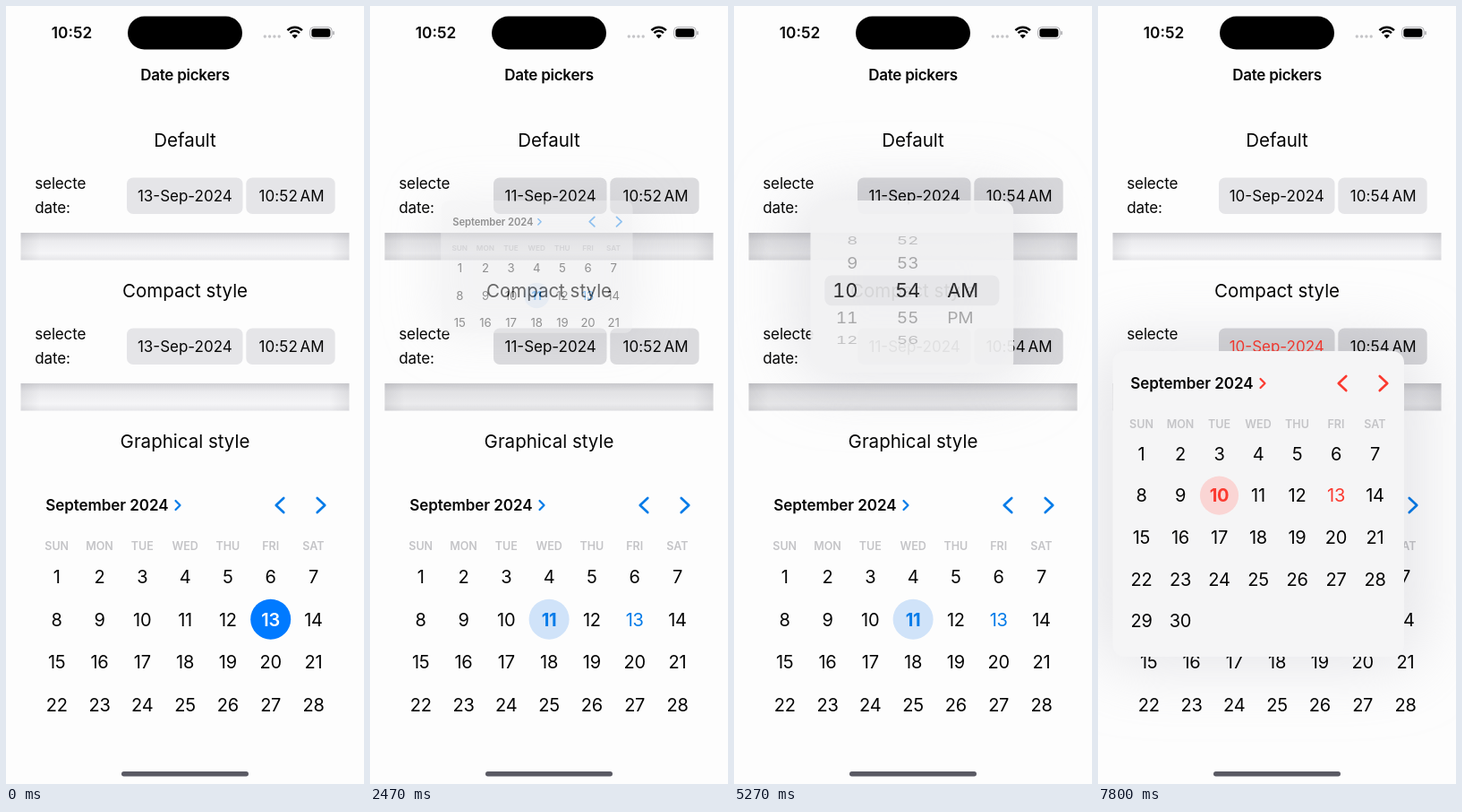
An HTML page for the animation above (8 s loop, 400 by 868 pixels).

```html
<!DOCTYPE html>
<html lang="en">
<head>
<meta charset="utf-8">
<title>Date pickers</title>
<style>
html, body { margin: 0; width: 100%; height: 100%; overflow: hidden; background: #fdfdfd; }
svg { display: block; width: 100vw; height: 100vh; font-family: Inter, Roboto, sans-serif; }
text { white-space: pre; }
.shade { mix-blend-mode: multiply; }
.wheel { font-feature-settings: "tnum"; }
</style>
</head>
<body>
<svg id="stage" viewBox="0 0 400 868">
  <defs>
    <linearGradient id="band" x2="0" y2="1">
      <stop offset="0" stop-color="#d0d0d4"/>
      <stop offset=".3" stop-color="#ebebee"/>
      <stop offset=".75" stop-color="#f5f5f7"/>
      <stop offset="1" stop-color="#e6e6e9"/>
    </linearGradient>
    <linearGradient id="ends">
      <stop offset="0" stop-color="#85858c" stop-opacity=".16"/>
      <stop offset=".06" stop-color="#85858c" stop-opacity="0"/>
      <stop offset=".94" stop-color="#85858c" stop-opacity="0"/>
      <stop offset="1" stop-color="#85858c" stop-opacity=".16"/>
    </linearGradient>
    <filter id="blur" filterUnits="userSpaceOnUse" x="-200" y="0" width="800" height="1000">
      <feGaussianBlur stdDeviation="36"/>
    </filter>
  </defs>
</svg>
<script>
const LOOP = 8000, TODAY = 13;
const INK = '#050505', BLUE = '#047be8', RED = '#fb3a30', GRAY = '#c4c4c7';
const stage = document.getElementById('stage');
const defs = stage.querySelector('defs');

function set(node, attrs) {
  for (const key in attrs) node.setAttribute(key, attrs[key]);
  return node;
}
function add(parent, tag, attrs) {
  const node = document.createElementNS('http://www.w3.org/2000/svg', tag);
  parent.appendChild(node);
  return set(node, attrs);
}
function label(parent, str, x, y, size, attrs) {
  const node = add(parent, 'text', { x, y, 'font-size': size, fill: INK, ...attrs });
  node.textContent = str;
  return node;
}
const box = (parent, x, y, width, height, rx, fill, attrs) =>
  add(parent, 'rect', { x, y, width, height, rx, fill, ...attrs });
const clamp = v => Math.max(0, Math.min(1, v));
const centered = { 'text-anchor': 'middle' };
const bold = { 'font-weight': 600 };

// Opening has a slight bounce, closing has none.
function springIn(t) {
  if (t <= 0) return 0;
  const w = 0.0165, zeta = 0.85, root = Math.sqrt(1 - zeta * zeta), phase = w * root * t;
  return 1 - Math.exp(-zeta * w * t) * (Math.cos(phase) + zeta / root * Math.sin(phase));
}
function springOut(t) {
  const wt = 0.0129 * Math.max(0, t);
  return (1 + wt) * Math.exp(-wt);
}

function chevron(parent, x, y, w, h, color, width) {
  add(parent, 'path', {
    d: `M${x - w / 2} ${y - h / 2}l${w} ${h / 2}l${-w} ${h / 2}`,
    fill: 'none', stroke: color, 'stroke-width': width,
    'stroke-linecap': 'round', 'stroke-linejoin': 'round'
  });
}

function statusBar() {
  label(stage, '10:52', 73.5, 36, 17.2, { ...centered, ...bold });
  box(stage, 136, 11.5, 128, 37, 18.5, '#000');
  for (let i = 0; i < 4; i++) add(stage, 'circle', { cx: 289.3 + i * 5.3, cy: 34, r: 1.7, fill: GRAY });
  for (const r of [11.6, 7.4]) {
    const d = r * 0.71;
    add(stage, 'path', {
      d: `M${322.7 - d} ${35.3 - d}A${r} ${r} 0 0 1 ${322.7 + d} ${35.3 - d}`,
      fill: 'none', stroke: '#000', 'stroke-width': 2.5
    });
  }
  add(stage, 'path', { d: 'M322.7 36.3l-3.2 -3.3a4.6 4.6 0 0 1 6.4 0z', fill: '#000' });
  box(stage, 339.6, 23.6, 24.6, 12.8, 4, 'none', { stroke: '#aeaeb2' });
  box(stage, 341.4, 25.3, 21, 9.4, 2.6, '#000');
  box(stage, 365.2, 28, 1.7, 4.2, 0.8, '#aeaeb2');
  label(stage, 'Date pickers', 200, 83, 17, { ...centered, ...bold, 'letter-spacing': -0.25 });
}

function pickerRow(title, y) {
  label(stage, title, 200, y, 20.5, centered);
  const body = { 'letter-spacing': -0.15 };
  label(stage, 'selecte', 32.3, y + 47, 17, body);
  label(stage, 'date:', 32.3, y + 74, 17, body);
  const dateBox = box(stage, 135, y + 34.5, 129.5, 40.5, 7);
  const timeBox = box(stage, 268.3, y + 34.5, 99.4, 40.5, 7);
  const end = { 'text-anchor': 'end' };
  const date = label(stage, '', 252.8, y + 61, 17, end);
  const time = label(stage, '', 355.8, y + 61, 17, { ...end, 'letter-spacing': 0.1 });
  const clock = add(time, 'tspan', {});
  add(time, 'tspan', { dx: 2.6 }).textContent = 'AM';
  box(stage, 16.5, y + 96, 367, 30.5, 0, 'url(#band)');
  box(stage, 16.5, y + 96, 367, 30.5, 0, 'url(#ends)');
  const veil = box(stage, 16.5, y + 96, 367, 30.5, 0, '#707074');
  return (day, minute, dim, dateColor, timeColor) => {
    const x = day === 11 ? 138 : 135;
    const mix = (a, b) => Math.round(a + (b - a) * dim);
    const fill = `rgb(${mix(229, 214)},${mix(229, 214)},${mix(232, 217)})`;
    set(dateBox, { x, width: 264.5 - x, fill });
    set(timeBox, { fill });
    set(date, { fill: dateColor }).textContent = day + '-Sep-2024';
    set(time, { fill: timeColor });
    clock.textContent = '10:' + minute;
    set(veil, { opacity: 0.12 * dim });
  };
}

function calendar(parent, o) {
  label(parent, 'September 2024', o.left - 0.8, o.head + 6.1, 17, { ...bold, 'letter-spacing': -0.05 });
  chevron(parent, o.left + 147, o.head, 5, 10, o.color, 2.2);
  chevron(parent, o.nav, o.head, -8.5, 16, o.color, 2.7);
  chevron(parent, o.nav + 46, o.head, 8.5, 16, o.color, 2.7);
  const colX = c => o.x + c * o.dx, rowY = r => o.y + r * o.dy;
  'SUN MON TUE WED THU FRI SAT'.split(' ').forEach((name, c) =>
    label(parent, name, colX(c), o.week + 4.5, 12.5, { ...centered, ...bold, fill: GRAY }));
  const at = day => ({ cx: colX((day - 1) % 7), cy: rowY(Math.floor((day - 1) / 7)) });
  const solid = add(parent, 'circle', { ...at(TODAY), r: o.r, fill: '#007aff' });
  const pale = add(parent, 'circle', { r: o.r, fill: o.pale });
  const days = [];
  for (let d = 1; d <= o.last; d++) {
    const p = at(d);
    days[d] = label(parent, d, p.cx, p.cy + 7.3, 20, { ...centered, 'letter-spacing': -0.2 });
  }
  return (picked, fade) => {
    const today = picked === TODAY;
    set(solid, { opacity: today ? 1 : 1 - fade });
    set(pale, { ...at(picked), opacity: today ? 0 : fade });
    days.forEach((node, d) => {
      const on = d === picked;
      const fill = on && today ? '#fff' : on || d === TODAY ? o.color : INK;
      set(node, { fill, 'font-weight': on ? (today ? 600 : 700) : 400 });
    });
  };
}

// The panel grows from a point on its top edge; its height lags behind its width.
function popover(id, x, y, w, h, anchor, fill) {
  const shade = box(stage, x - 18, y - 8, w + 36, h + 16, 40, '#cdcdd4', { class: 'shade', filter: 'url(#blur)' });
  const group = add(stage, 'g', {});
  const clip = box(add(defs, 'clipPath', { id }), x, y, w, h, 13);
  const panel = box(group, x, y, w, h, 13, fill);
  const content = add(group, 'g', { 'clip-path': `url(#${id})` });
  const show = s => {
    const display = s < 0.03 ? 'none' : 'inline';
    const transform = `translate(${anchor} ${y}) scale(${s}) translate(${-anchor} ${-y})`;
    const opacity = clamp(Math.pow(s, 2.1));
    set(group, { display, transform, opacity });
    set(shade, { display, transform, opacity: 0.5 * opacity, height: h * s + 16 });
    set(panel, { height: h * s });
    set(clip, { height: h * s });
  };
  return { content, show };
}

function datePopover(id, y, color, pale) {
  const pop = popover(id, 16.5, y, 325.5, 341, 200, '#f5f5f6');
  const pick = calendar(pop.content, {
    left: 37, head: y + 36, nav: 273, week: y + 81, x: 48.5, dx: 43.5,
    y: y + 114.5, dy: 46.6, r: 21.6, last: 30, color, pale
  });
  return { show: pop.show, pick };
}

function wheel(parent, x, anchor, text) {
  const items = [];
  for (let k = -3; k <= 3; k++) {
    items.push(label(parent, '', 0, 8.3, 23, { class: 'wheel', 'text-anchor': anchor, fill: '#202022', 'letter-spacing': -0.2 }));
  }
  return pos => items.forEach((node, i) => {
    const index = Math.round(pos) + i - 3;
    const d = index - pos, far = Math.abs(d), angle = d * 0.436;
    const size = 1 - 0.13 * Math.min(1, far);
    const opacity = far > 2.6 ? 0 : far < 1 ? 1 - 0.62 * far : 0.38 - 0.14 * (far - 1);
    set(node, {
      opacity,
      transform: `translate(${x} ${321 + 75.7 * Math.sin(angle)}) scale(${size} ${size * Math.cos(angle)})`
    }).textContent = text(index);
  });
}

function timePopover() {
  const pop = popover('time', 76, 217, 236, 208, 318, '#f3f3f4');
  box(pop.content, 92.5, 304, 203, 35, 8, '#e7e7e9');
  const hours = wheel(pop.content, 131, 'end', i => i);
  const minutes = wheel(pop.content, 189, 'middle', i => i);
  const half = wheel(pop.content, 235, 'start', i => ['AM', 'PM'][i] || '');
  hours(10);
  half(0);
  return { show: pop.show, minutes };
}

statusBar();
const rowA = pickerRow('Default', 157);
const rowB = pickerRow('Compact style', 325);
label(stage, 'Graphical style', 200, 493, 20.5, centered);
const inline = calendar(stage, {
  left: 45, head: 557, nav: 306, week: 602, x: 56.7, dx: 47.8,
  y: 636.3, dy: 47.9, r: 22.5, last: 28, color: BLUE, pale: '#d0e3f9'
});
box(stage, 129, 854, 142, 5.4, 2.7, '#5a5a64');
const popA = datePopover('dateA', 217, BLUE, '#d6e2f1');
const popTime = timePopover();
const popB = datePopover('dateB', 385, RED, '#fad5d4');

const span = (open, close) => ({
  size: t => springIn(t - open) * springOut(t - close),
  active: t => t >= open + 23 && t < close
});
const spanA = span(577, 2377), spanTime = span(2847, 5247), spanB = span(6107, LOOP);

// A flick of the minute wheel that slows down and settles.
const minuteAt = t => 52 + 2 * (1 - Math.pow(1 - clamp((t - 4380) / 610), 2.2));

function draw(t) {
  const day = t < 1800 ? TODAY : t < 7470 ? 11 : 10;
  const minute = t < 4990 ? 52 : 54;
  const a = spanA.size(t), m = spanTime.size(t), b = spanB.size(t);
  const near = clamp(Math.max(a, m));
  rowA(day, minute, near, spanA.active(t) ? BLUE : INK, spanTime.active(t) ? BLUE : INK);
  rowB(day, minute, clamp(Math.max(near, b)), spanB.active(t) ? RED : INK, INK);
  inline(day, clamp((t - 1800) / 330));
  popA.pick(day, 1);
  popB.pick(day, 1);
  popTime.minutes(minuteAt(t));
  popA.show(a);
  popTime.show(m);
  popB.show(b);
}

const start = performance.now();
function tick() {
  draw((performance.now() - start) % LOOP);
  requestAnimationFrame(tick);
}
tick();
</script>
</body>
</html>
```
